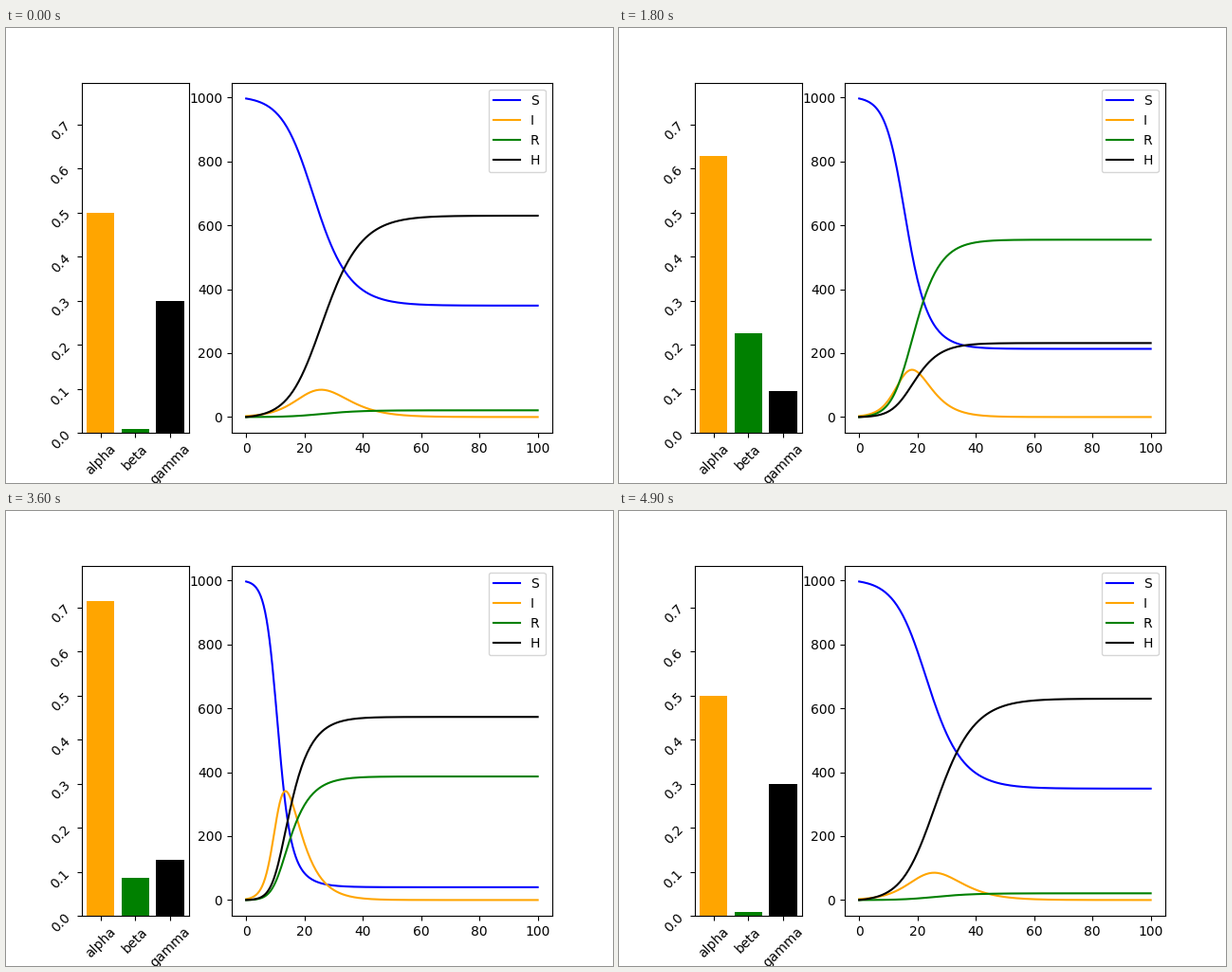
Animation, 640 px wide and 480 px high, one loop 5000 ms. Source, as a matplotlib script:

```python
import numpy as np
import matplotlib.pyplot as plt
from matplotlib.animation import FuncAnimation

FRAMES = 50
POPULATION = 1000
START = np.array([997.0, 3.0, 0.0, 0.0])
DAYS = np.linspace(0, 100, 201)
SUBSTEPS = 2

# Bezier control points for (alpha, beta, gamma); the path is a closed loop.
CONTROL = np.array([
    [0.5, 0.01, 0.3],
    [0.5, 0.5, 0.005],
    [1.0, 0.01, 0.005],
    [0.5, 0.01, 0.3],
])


def bezier(t):
    u = 1 - t
    weights = np.stack([u**3, 3 * t * u**2, 3 * t**2 * u, t**3], axis=-1)
    return weights @ CONTROL


def slope(state, rates):
    alpha, beta, gamma = rates
    s, i = state[:2]
    infected = alpha * s * i / POPULATION
    return np.array([-infected, infected - (beta + gamma) * i, beta * i, gamma * i])


def simulate(rates):
    """Integrate the four compartments with classic Runge-Kutta."""
    h = (DAYS[1] - DAYS[0]) / SUBSTEPS
    state = START.copy()
    history = [state]
    for _ in DAYS[1:]:
        for _ in range(SUBSTEPS):
            k1 = slope(state, rates)
            k2 = slope(state + h / 2 * k1, rates)
            k3 = slope(state + h / 2 * k2, rates)
            k4 = slope(state + h * k3, rates)
            state = state + h / 6 * (k1 + 2 * k2 + 2 * k3 + k4)
        history.append(state)
    return np.array(history).T


path = bezier(np.linspace(0, 1, FRAMES))

plt.rcParams["font.family"] = "DejaVu Sans"
fig, (bar_ax, line_ax) = plt.subplots(
    1, 2, figsize=(6.4, 4.8), dpi=100, gridspec_kw={"width_ratios": [1, 3]})

bars = bar_ax.bar(["alpha", "beta", "gamma"], path[0],
                  color=["orange", "green", "black"])
bar_ax.set_ylim(0, path.max() * 1.1)
bar_ax.tick_params(axis="both", labelrotation=45)

lines = [line_ax.plot(DAYS, values, color=color, label=label)[0]
         for values, color, label in zip(simulate(path[0]),
                                         ["blue", "orange", "green", "black"],
                                         "SIRH")]
line_ax.set_ylim(-0.05 * START[0], 1.05 * START[0])
line_ax.legend(loc="best")


def update(frame):
    rates = path[frame]
    for bar, rate in zip(bars, rates):
        bar.set_height(rate)
    for line, values in zip(lines, simulate(rates)):
        line.set_ydata(values)
    return [*bars, *lines]


animation = FuncAnimation(fig, update, frames=FRAMES, interval=100,
                          repeat=True, repeat_delay=0, blit=False)
plt.show()
```
